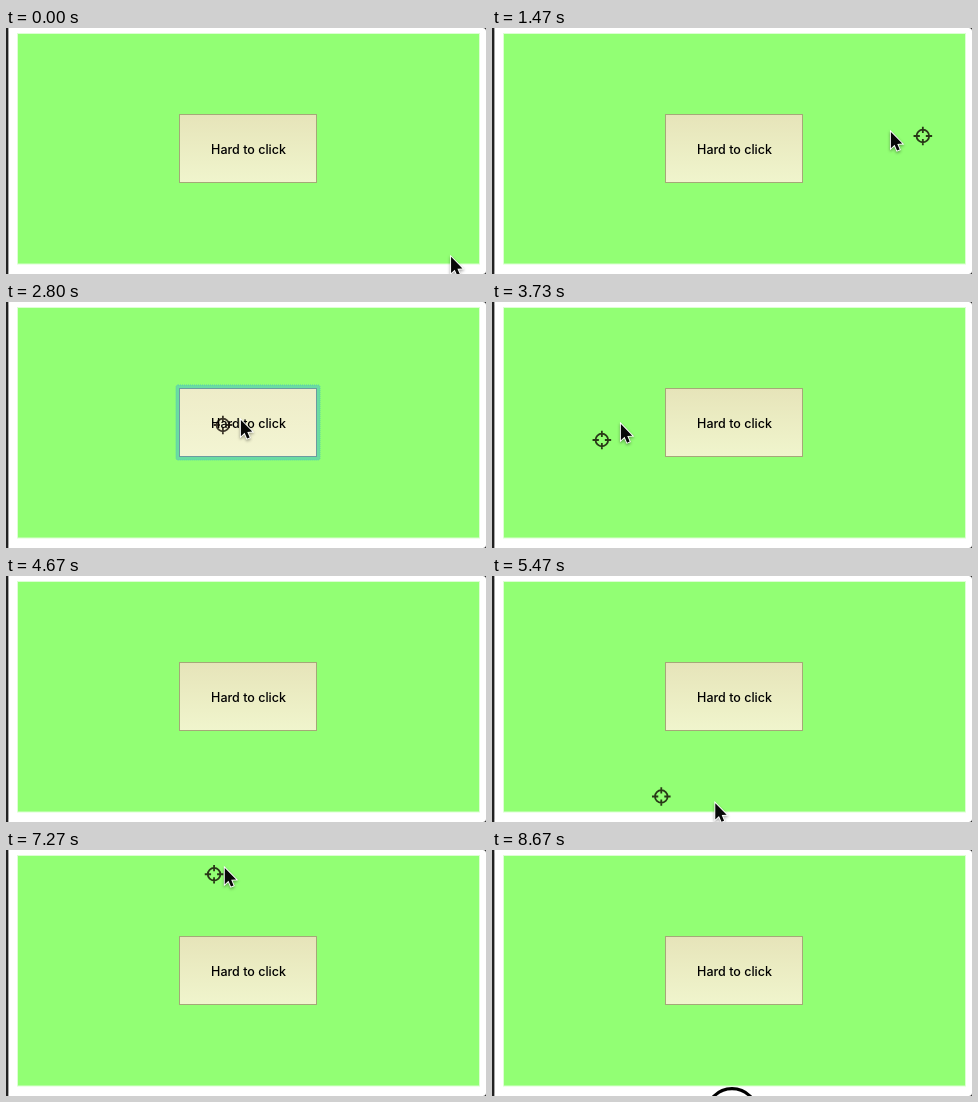
Write an HTML page with a canvas that moves like this. It is 480 px wide and 246 px high and loops after 8740 ms.

```html
<!DOCTYPE html>
<html>
<head>
<meta charset="utf-8">
<style>
  html, body { margin: 0; width: 100%; height: 100%; overflow: hidden; background: #fff; }
  canvas { display: block; }
</style>
</head>
<body>
<canvas id="stage" width="480" height="246"></canvas>
<script>
const ctx = document.getElementById('stage').getContext('2d');
const LOOP = 8740;
const FIELD = { x: 12, y: 6, w: 461, h: 229.5 };
const BUTTON = { x: 173, y: 86, w: 138, h: 69 };

// Three sweeps of the pointer: time, position, offset of the sight
const sweeps = [
  [[0, 445, 229, 60, 30], [650, 482, 118, 60, 30]],
  [[870, 479, 97, 32, 4], [1470, 399, 104, 32, 4], [2800, 235, 118, -18, 5],
   [3730, 129, 122, -19, 16], [4670, 1, 155, -19, 0]],
  [[5350, 225, 248, -56, -6], [6200, 213, 102, -42, -11], [7500, 220, 0, -4, 10]]
];

const arrow = [[0, 0], [0, 16.2], [3.7, 12.8], [6.2, 18.6], [8.8, 17.5], [6.4, 11.9], [11.4, 11.6]];
const head = [[6, 1.2], [6, 4.5], [11, 0], [6, -4.5], [6, -1.2]];
const resize = [...head, ...head.map(([x, y]) => [-x, -y])];

const inside = (x, y, box) => x > box.x && x < box.x + box.w && y > box.y && y < box.y + box.h;

function pointerAt(t) {
  for (const keys of sweeps) {
    const i = keys.findIndex(key => key[0] > t);
    if (i < 1) continue;
    const a = keys[i - 1], b = keys[i];
    const k = (t - a[0]) / (b[0] - a[0]);
    const [, x, y, dx, dy] = a.map((v, n) => v + (b[n] - v) * k);
    return { x, y, sx: x + dx, sy: y + dy };
  }
  return null;
}

function rect(x, y, w, h, color) {
  ctx.fillStyle = color;
  ctx.fillRect(x, y, w, h);
}

function drawStage() {
  rect(0, 0, 480, 246, '#222');
  ctx.fillStyle = '#fff';
  ctx.beginPath();
  ctx.roundRect(2.4, 0, 477.6, 246, [0, 3, 3, 0]);
  ctx.fill();
  const { x, y, w, h } = FIELD;
  rect(x - 1, y - 1, w + 2, h + 2, '#dcffd2');
  rect(x, y, w, h, '#92ff74');
}

function drawButton(hot) {
  const { x, y, w, h } = BUTTON;
  ctx.lineWidth = 1;
  if (hot) {
    ctx.beginPath();
    ctx.roundRect(x - 3, y - 3, w + 6, h + 6, 2);
    ctx.fillStyle = '#6adca2';
    ctx.fill();
    ctx.strokeStyle = '#58cdb0';
    ctx.setLineDash([1, 1]);
    ctx.stroke();
    ctx.setLineDash([]);
  }
  const fill = ctx.createLinearGradient(0, y, 0, y + h);
  fill.addColorStop(0, hot ? '#eeecc8' : '#e6e4b9');
  fill.addColorStop(1, hot ? '#f3f5d3' : '#f0f5cd');
  rect(x, y, w, h, fill);
  ctx.strokeStyle = hot ? '#6c9ba0' : '#a5a878';
  ctx.strokeRect(x + 0.5, y + 0.5, w - 1, h - 1);
  ctx.fillStyle = '#000';
  ctx.font = '500 12.5px Inter, sans-serif';
  ctx.textAlign = 'center';
  ctx.fillText('Hard to click', 242.5, 125.5);
}

function drawSight(x, y) {
  ctx.strokeStyle = 'rgba(15, 8, 0, .8)';
  ctx.lineWidth = 1.8;
  ctx.beginPath();
  ctx.arc(x, y, 6.3, 0, 2 * Math.PI);
  for (const s of [-1, 1]) {
    ctx.moveTo(x + 3 * s, y);
    ctx.lineTo(x + 9.3 * s, y);
    ctx.moveTo(x, y + 3 * s);
    ctx.lineTo(x, y + 9.3 * s);
  }
  ctx.stroke();
}

function drawPointer(x, y, shape) {
  ctx.save();
  ctx.translate(x, y);
  ctx.beginPath();
  shape.forEach(point => ctx.lineTo(...point));
  ctx.closePath();
  ctx.shadowColor = 'rgba(0, 0, 0, .4)';
  ctx.shadowBlur = 3;
  ctx.shadowOffsetY = 1.5;
  ctx.strokeStyle = '#fff';
  ctx.lineWidth = 1.8;
  ctx.stroke();
  ctx.shadowColor = 'transparent';
  ctx.fillStyle = '#080808';
  ctx.fill();
  ctx.restore();
}

function drawRing(opacity) {
  ctx.globalAlpha = opacity;
  ctx.beginPath();
  ctx.arc(240, 264, 25.4, 0, 2 * Math.PI);
  ctx.fillStyle = '#fff';
  ctx.fill();
  ctx.strokeStyle = '#000';
  ctx.lineWidth = 3.2;
  ctx.stroke();
  ctx.globalAlpha = 1;
}

function draw(now) {
  const t = now % LOOP;
  const p = pointerAt(t);
  drawStage();
  drawButton(p && inside(p.sx, p.sy, BUTTON));
  if (p) {
    if (inside(p.x, p.y, FIELD) && inside(p.sx, p.sy, FIELD)) drawSight(p.sx, p.sy);
    drawPointer(p.x, p.y, p.x < FIELD.x ? resize : arrow);
  }
  if (t > 8590) drawRing(Math.min(1, (t - 8560) / 90));
  requestAnimationFrame(draw);
}
requestAnimationFrame(draw);
</script>
</body>
</html>
```
